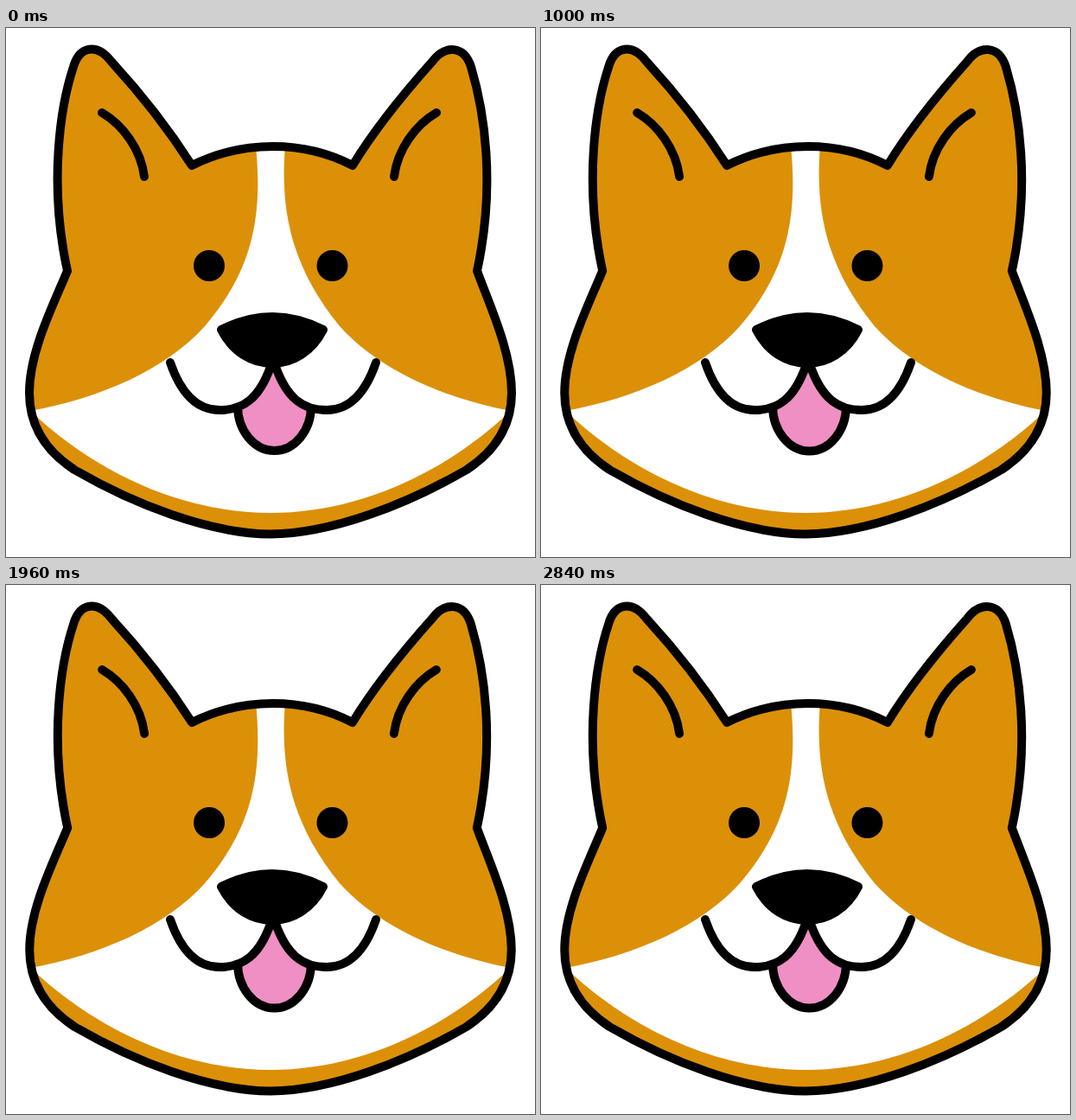
Recreate the animation shown at these times as an HTML page. Size 612 by 612 pixels, loop 2880 ms.

```html
<!DOCTYPE html>
<html lang="en">
<head>
<meta charset="utf-8">
<title>Panting dog</title>
<style>
  html, body { margin: 0; height: 100%; overflow: hidden; background: #fff; }
  svg { display: block; width: 100%; height: 100%; }
  .line { fill: none; stroke: #000; stroke-width: 10; stroke-linecap: round; stroke-linejoin: round; }
  .pink { fill: #ef8fc4; }
  #tongue { vector-effect: non-scaling-stroke; }
</style>
</head>
<body>
<svg viewBox="0 0 612 612">
  <defs>
    <path id="outline" d="M215 159 C245 144 278 137 309 137 S372 144 401 159
      C424 121 460 76 493 39 C508 19 530 20 538 45 C553 95 567 180 545 281
      C560 322 585 375 585 422 C585 462 565 490 533 511 C464 551 377 585 306 585.5
      C235 585 148 551 79 511 C47 490 27 462 27 422 C27 375 54 322 71 281
      C49 180 63 90 78 45 C85 21 105 17 122 39 C156 76 190 120 215 159Z"/>
  </defs>

  <g id="head">
    <use href="#outline" fill="#dc9008"/>
    <path fill="#fff" d="M289 135 C296 210 290 275 230 345 C185 395 110 428 28 443
      C110 520 210 561 306 561 S502 520 584 443
      C505 428 431 395 386 345 C329 275 317 210 323 135Z"/>
    <use href="#outline" class="line"/>
    <path class="line" d="M111 98 C135 112 156 140 160 172 M498 98 C474 112 453 140 449 172"/>
    <circle cx="235" cy="275" r="18"/>
    <circle cx="377.5" cy="275" r="18"/>
  </g>

  <path class="pink" d="M268 438 L309 380 L353 438Z"/>
  <path id="tongue" class="line pink" d="M268 437 A42.5 52 0 0 0 353 437"/>

  <!-- White cheeks hide the root of the tongue -->
  <path class="line" style="fill:#fff"
    d="M190 387 C203 425 222 442 247 442 C275 442 293 428 306 392
       M428 387 C415 425 396 442 371 442 C343 442 325 428 312 392"/>
  <path class="line" style="fill:#000"
    d="M249 349 Q308 319 367 349 C354 375 331 388 308 388 S262 375 249 349Z"/>
</svg>
<script>
  const PERIOD = 960, STEP = 40;
  const head = document.getElementById('head');
  const tongue = document.getElementById('tongue');

  const scaleAbout = (x, y, sx, sy) =>
    `translate(${x} ${y}) scale(${sx} ${sy}) translate(${-x} ${-y})`;

  function draw() {
    const time = Math.floor(performance.now() / STEP) * STEP;
    const pant = (1 - Math.cos(2 * Math.PI * time / PERIOD)) / 2;
    head.setAttribute('transform', scaleAbout(306, 306, 1 - 0.051 * pant, 1));
    tongue.setAttribute('transform', scaleAbout(310, 437, 1 + 0.02 * pant, 1 + 0.51 * pant));
    requestAnimationFrame(draw);
  }
  draw();
</script>
</body>
</html>
```
